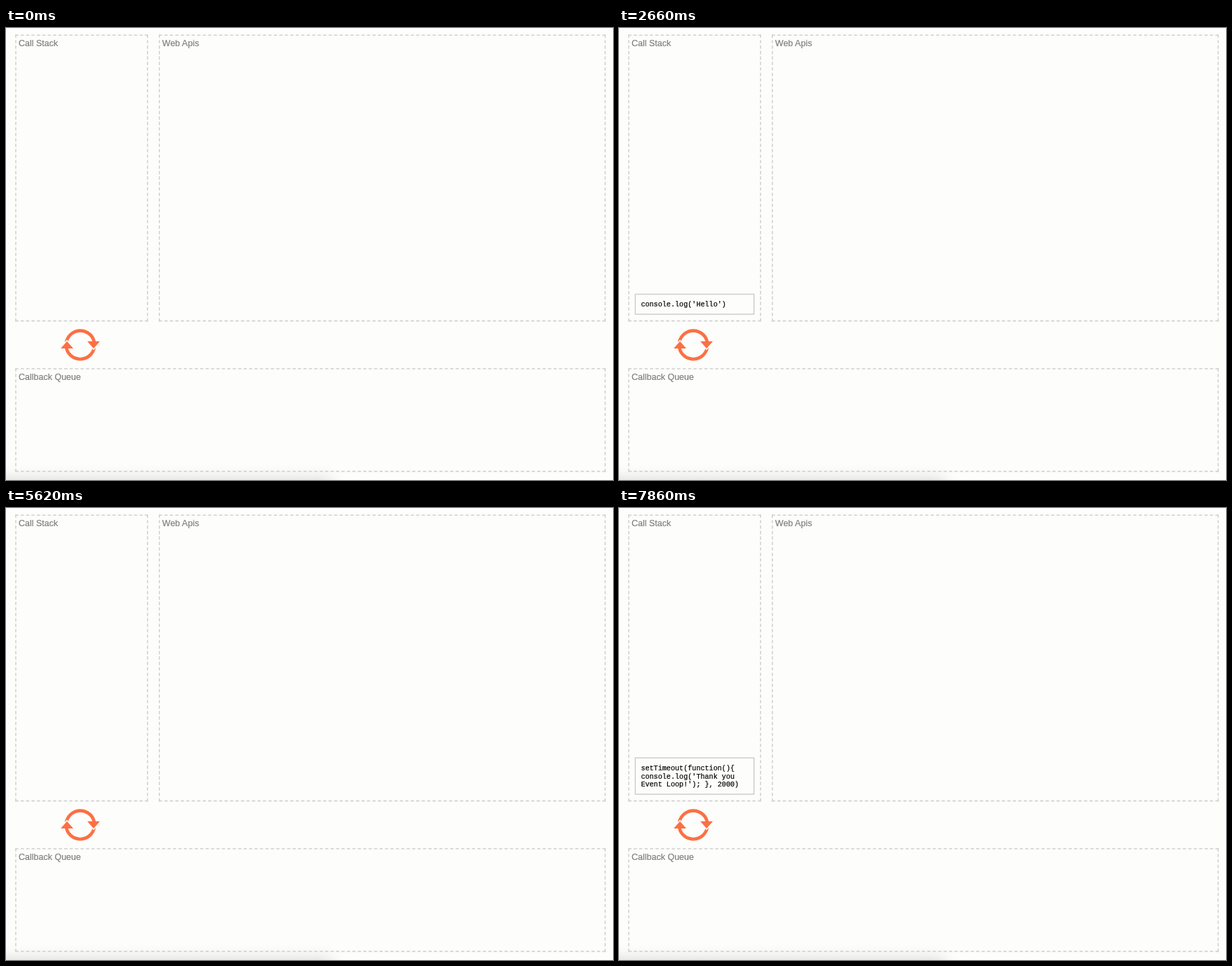
An HTML page that plays this animation: 867x646 px, repeating every 8000 ms.

```html
<!DOCTYPE html>
<html lang="en">
<head>
<meta charset="utf-8">
<title>Event loop</title>
<style>
  html, body { margin: 0; width: 100%; height: 100%; overflow: hidden; background: #fdfdfc; }
  svg { position: absolute; left: 0; top: 0; width: 100%; height: 100%; display: block; overflow: hidden; }
  .label {
    font: 12.5px "Liberation Sans", Arial, sans-serif;
    fill: #7f7f7f; stroke: #7f7f7f; stroke-width: .2;
  }
  .dash { stroke: #d1d1d1; stroke-width: 1.56; }
  .call { opacity: 0; }
  .call rect { fill: #fdfdfc; stroke: #d0d0d0; stroke-width: 1.56; }
  .call text {
    font: 10.14px "Liberation Mono", "Courier New", monospace;
    fill: #000; stroke: #000; stroke-width: .2; white-space: pre;
  }
  .arc { fill: none; stroke: #fb7043; stroke-width: 4.6; }
  .head { fill: #fb7043; stroke: #fdfdfc; stroke-width: 3; paint-order: stroke; }
</style>
</head>
<body>
<svg id="stage" viewBox="0 0 867 646">
  <defs>
    <filter id="blur" filterUnits="userSpaceOnUse" x="-60" y="590" width="600" height="120">
      <feGaussianBlur stdDeviation="10.5"/>
    </filter>
  </defs>
  <rect x="-40" y="646" width="504" height="40" fill="#000" fill-opacity=".17" filter="url(#blur)"/>
  <g id="panels"></g>
  <g transform="translate(106.1 452.9)">
    <path class="arc" d="M-19.9 -4A20.3 20.3 0 0 1 0 -20.3M19.9 4A20.3 20.3 0 0 1 0 20.3"/>
    <path class="head" d="M10 -5.1H28L19 5.2Z"/>
    <path class="head" d="M-10 5.1H-28L-19 -5.2Z"/>
    <path class="arc" d="M-.3 -20.3A20.3 20.3 0 0 1 19.8 -4.6M.3 20.3A20.3 20.3 0 0 1 -19.8 4.6"/>
  </g>
  <g id="calls"></g>
</svg>
<script>
  const LOOP = 8000;
  const LINE = 1.56, DASH = 3 * LINE, GAP = 2 * LINE;
  const LEADING = 11.7;
  const panels = document.getElementById('panels');
  const calls = document.getElementById('calls');

  function add(parent, tag, attrs, text) {
    const el = document.createElementNS('http://www.w3.org/2000/svg', tag);
    for (const key in attrs) el.setAttribute(key, attrs[key]);
    if (text) el.textContent = text;
    return parent.appendChild(el);
  }

  // A side starts and ends on a full dash, so the gap is fitted to its length.
  function side(x1, y1, x2, y2) {
    const len = Math.hypot(x2 - x1, y2 - y1);
    const count = Math.round((len + GAP) / (DASH + GAP));
    const gap = (len - count * DASH) / (count - 1);
    add(panels, 'line', { class: 'dash', x1, y1, x2, y2, 'stroke-dasharray': `${DASH} ${gap}` });
  }

  function panel(name, l, t, r, b) {
    const h = LINE / 2;
    side(l, t + h, r, t + h);
    side(l, b - h, r, b - h);
    side(l + h, t, l + h, b);
    side(r - h, t, r - h, b);
    add(panels, 'text', { class: 'label', x: l + 4.8, y: t + 16.8 }, name);
  }

  function call(lines, frames) {
    const g = add(calls, 'g', { class: 'call' });
    const extra = (lines.length - 1) * LEADING;
    add(g, 'rect', { x: 23.3, y: 380.5 - extra, width: 169.5, height: 28.6 + extra });
    lines.forEach((line, i) =>
      add(g, 'text', { x: 31.4, y: 398.4 - extra + i * LEADING }, line));
    g.animate(
      frames.map(([ms, opacity, easing = 'linear']) => ({ offset: ms / LOOP, opacity, easing })),
      { duration: LOOP, iterations: Infinity });
  }

  panel('Call Stack', 13.2, 9.4, 203, 419.4);
  panel('Web Apis', 218.3, 9.4, 856.5, 419.4);
  panel('Callback Queue', 13.2, 486.2, 856.5, 634.4);

  call(["console.log('Hello')"], [
    [0, 0], [1680, 0, 'ease'], [2270, 1], [3880, 1, 'ease'], [4180, 0], [LOOP, 0]
  ]);
  call(['setTimeout(function(){', "console.log('Thank you", "Event Loop!'); }, 2000)"], [
    [0, 0], [5870, 0, 'ease'], [6460, 1], [LOOP, 1]
  ]);
</script>
</body>
</html>
```
